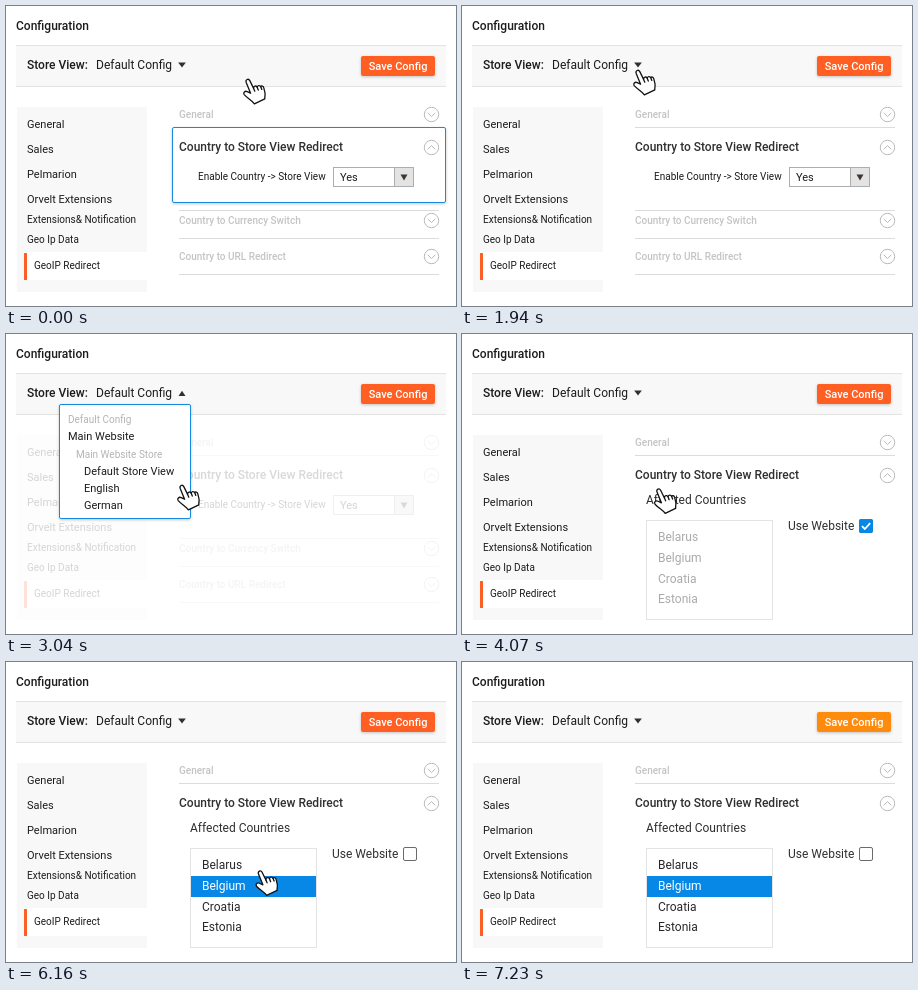
An HTML page that plays this animation: 450 by 300 pixels, repeating every 8730 ms.

```html
<!DOCTYPE html>
<html lang="en">
<head>
<meta charset="utf-8">
<title>Configuration</title>
<style>
  html, body { margin: 0; width: 100%; height: 100%; overflow: hidden; background: #fff; }
  svg { display: block; width: 100vw; height: 100vh; font-family: Roboto, "Open Sans", sans-serif; }
  text { fill: #1c1c1c; font-size: 12px; white-space: pre; }
  .m { font-weight: 500; }
  .s10 { font-size: 10px; }
  .s11 { font-size: 11px; }
  .dim { fill: #c4c4c4; }
  .soft { fill: #b4b4b4; }
  .head { fill: #303030; font-weight: 500; }
  .rule { stroke: #dcdcdc; fill: none; }
  .chev { stroke: #b9b9b9; fill: none; }
  .frame { fill: #fff; stroke: #168ae0; }
</style>
</head>
<body>
<svg viewBox="0 0 450 300">
  <defs>
    <filter id="shade" x="-10%" y="-20%" width="120%" height="150%">
      <feDropShadow dx="0" dy="1" stdDeviation="1.5" flood-color="#000" flood-opacity=".22"/>
    </filter>
    <g id="down" class="chev"><circle r="7.2"/><path d="M-3.8-1.6 0 2 3.8-1.6"/></g>
    <g id="up" class="chev"><circle r="7.2"/><path d="M-3.8 1.8 0-1.8 3.8 1.8"/></g>
  </defs>
  <rect width="450" height="300" fill="#fff"/>

  <text class="m" x="10" y="24">Configuration</text>
  <rect x="10" y="39" width="430" height="42" fill="#f8f8f8"/>
  <path d="M10 39.5H440M10 80.5H440" stroke="#e3e3e3"/>
  <text class="m" x="21" y="63" fill="#303030">Store View:</text>
  <text x="90" y="63">Default Config</text>
  <path id="arrow" fill="#303030"/>
  <rect id="save" x="355" y="50" width="74" height="20" rx="2" filter="url(#shade)"/>
  <text class="s11 m" x="392" y="64" text-anchor="middle" style="fill:#fff">Save Config</text>

  <g id="base">
    <rect x="11" y="101" width="130" height="185" fill="#f8f8f8"/>
    <rect x="18" y="246" width="123" height="28" fill="#fff"/>
    <rect x="18" y="247" width="3" height="27" fill="#fb6026"/>
    <g id="menu"></g>
    <text class="s10 m dim" x="173" y="112">General</text>
    <path class="rule" d="M173 121.5H433"/>
    <use href="#down" x="425.5" y="108.5"/>
    <rect id="focus" class="frame" x="166.5" y="121.5" width="273" height="75" rx="1.5" filter="url(#shade)"/>
    <text class="head" x="173" y="145">Country to Store View Redirect</text>
    <use href="#up" x="425.5" y="141.5"/>
  </g>

  <g id="general">
    <text class="s10" x="192" y="174">Enable Country -&gt; Store View</text>
    <rect x="327.5" y="161.5" width="80" height="19" fill="#fff" stroke="#adadad"/>
    <rect x="388.5" y="161.5" width="19" height="19" fill="#e3e3e3" stroke="#adadad"/>
    <path d="M394.5 168.5h7l-3.5 6z" fill="#41362f"/>
    <text class="s11" x="334" y="175">Yes</text>
    <path class="rule" d="M173 204.5H433M173 232.5H433M173 268.5H433"/>
    <text class="s10 m dim" x="173" y="218">Country to Currency Switch</text>
    <text class="s10 m dim" x="173" y="254">Country to URL Redirect</text>
    <use href="#down" x="425.5" y="214.5"/>
    <use href="#down" x="425.5" y="250.5"/>
  </g>

  <g id="countries">
    <text x="184" y="170" style="fill:#303030">Affected Countries</text>
    <rect x="184.5" y="186.5" width="126" height="99" fill="#fff" stroke="#e3e3e3"/>
    <rect id="mark" x="185" y="214" width="125" height="21" fill="#0788e6"/>
    <g id="list"></g>
    <text x="326" y="196" style="fill:#303030">Use Website</text>
    <rect x="397.5" y="185.5" width="13" height="13" rx="1.5" fill="#fff" stroke="#6a6a6a"/>
    <g id="check">
      <rect x="397" y="185" width="14" height="14" rx="2" fill="#0788e6"/>
      <path d="M400 192.2l2.8 2.8 5.4-5.8" fill="none" stroke="#fff" stroke-width="1.8"/>
    </g>
  </g>

  <g id="drop">
    <rect class="frame" x="53.5" y="70.5" width="131" height="114" rx="1.5" filter="url(#shade)"/>
    <g id="options"></g>
  </g>

  <g id="hand" stroke="#111" stroke-width="1.3" stroke-linejoin="round" stroke-linecap="round">
    <path fill="#fff" d="M7.6 15.2 3.2 4.4C2.2 1.6 5.4 0 6.8 2.6L10.6 10.4C10.4 7.8 13.4 7.2 14.2 9.2 14.4 7.2 17 7 17.8 8.8 18.4 7.4 20.4 7.8 20.8 9.8L22 14.8C22.4 17 21.6 18.6 21.8 20.8L11.4 25.8C9.6 22.8 4.6 20.4 1.2 16.6-.2 14.4 2 12.6 4.2 13.6Z"/>
    <path fill="none" d="M10.6 10.4l1.2 2.8M14.2 9.2l1.1 2.9M17.8 8.8l1 2.6"/>
  </g>
</svg>
<script>
const LOOP = 8730, TICK = 30;
const $ = id => document.getElementById(id);

const fillRows = (id, rows) => {
  $(id).innerHTML = rows.map(([label, x, y, cls = '']) =>
    `<text class="${cls}" x="${x}" y="${y}">${label}</text>`).join('');
};

fillRows('menu', [
  ['General', 21, 122, 's11'],
  ['Sales', 21, 147, 's11'],
  ['Pelmarion', 21, 172, 's11'],
  ['Orvelt Extensions', 21, 197, 's11'],
  ['Extensions&amp; Notification', 21, 217, 's10'],
  ['Geo Ip Data', 21, 237, 's10'],
  ['GeoIP Redirect', 28, 263, 's10']
]);
fillRows('list', [
  ['Belarus', 196, 207],
  ['Belgium', 196, 228],
  ['Croatia', 196, 249],
  ['Estonia', 196, 269]
]);
fillRows('options', [
  ['Default Config', 62, 89, 's10 soft'],
  ['Main Website', 62, 106, 's11'],
  ['Main Website Store', 70, 124, 's10 soft'],
  ['Default Store View', 78, 141, 's11'],
  ['English', 78, 158, 's11'],
  ['German', 78, 175, 's11']
]);

// Pointer legs: start time, number of ticks, end point
const HOME = [237, 72];
const LEGS = [
  [1520, 15, 171, 63],
  [2470, 15, 171, 150],
  [4070, 11, 400, 190],
  [5180, 8, 240, 219],
  [6160, 14, 370, 60]
];

const ramp = (t, start, ticks = 5) =>
  Math.max(0, Math.min(1, (Math.floor((t - start) / TICK) + 1) / ticks));
const mix = (a, b, k) => a + (b - a) * k;
const blend = (a, b, k) => `rgb(${a.map((v, i) => Math.round(mix(v, b[i], k)))})`;
const show = (id, k) => $(id).setAttribute('opacity', k);

function pointer(t) {
  let [x, y] = HOME;
  for (const [start, ticks, tx, ty] of LEGS) {
    const k = ramp(t, start, ticks);
    x = mix(x, tx, k);
    y = mix(y, ty, k);
  }
  return [x, y];
}

function draw(t) {
  const open = ramp(t, 2470), swap = ramp(t, 3670, 2);
  const veil = mix(1, 0.18, open);
  const isOpen = t >= 2470 && t < 3670;
  const picked = t >= 5390;

  $('arrow').setAttribute('d', isOpen ? 'M172.5 62h7l-3.5-5.2z' : 'M172.2 56.4h7.6l-3.8 5z');
  show('focus', 1 - ramp(t, 1030));
  show('base', mix(veil, 1, swap));
  show('general', veil * (1 - swap));
  show('countries', swap);
  show('drop', open * (1 - swap));

  const free = ramp(t, 4860);
  show('check', 1 - free);
  show('mark', picked ? 1 : 0);
  const ink = blend([170, 170, 170], [40, 40, 40], free);
  [...$('list').children].forEach((row, i) => {
    row.style.fill = picked && i === 1 ? '#fff' : ink;
  });

  $('save').setAttribute('fill', blend([255, 94, 32], [255, 139, 8], ramp(t, 6620)));
  $('hand').setAttribute('transform', `translate(${pointer(t)})`);
  show('hand', 1 - ramp(t, 7110));
}

const begin = performance.now();
function loop() {
  draw((performance.now() - begin) % LOOP);
  requestAnimationFrame(loop);
}
loop();
</script>
</body>
</html>
```
